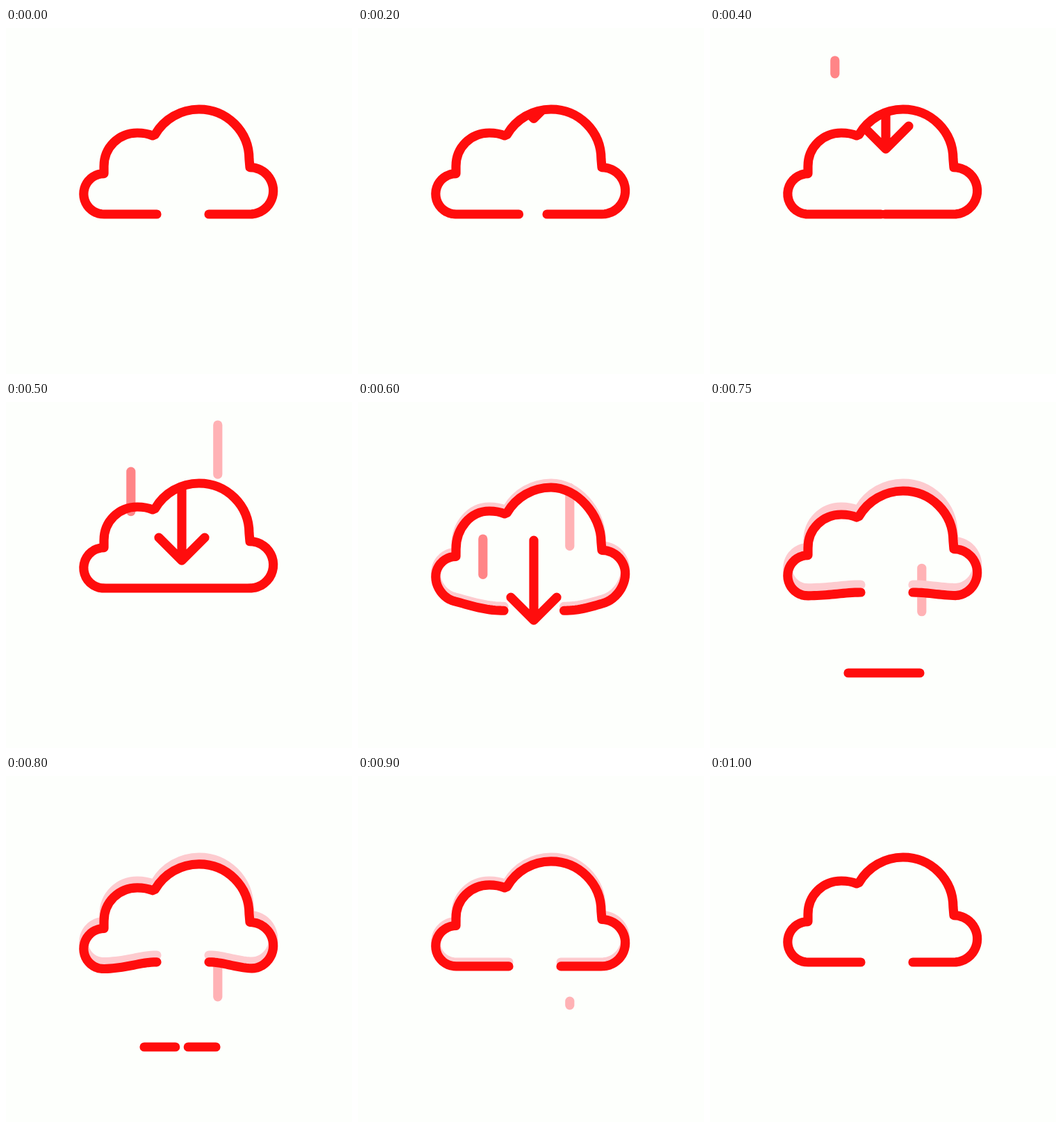
An HTML page for the animation above (1100 ms loop, 498 px wide and 498 px high).

```html
<!DOCTYPE html>
<html lang="en">
<head>
<meta charset="utf-8">
<title>Cloud download</title>
<style>
  html, body { margin: 0; width: 100%; height: 100%; overflow: hidden; background: #fdfffc; }
  svg { display: block; width: 100vw; height: 100vh; }
  path { fill: none; stroke: #ff0d0d; stroke-width: 13.2; stroke-linecap: round; stroke-linejoin: round; }
  #ghost { stroke: #fdcbcf; }
  #dropL { stroke: #ff8587; }
  #dropR { stroke: #ffb2b5; }
</style>
</head>
<body>
<svg viewBox="0 0 498 498">
  <clipPath id="below">
    <circle cx="278" cy="190" r="73"/>
    <rect y="155" width="498" height="343"/>
  </clipPath>
  <path id="dropL"/>
  <path id="dropR"/>
  <path id="ghost"/>
  <g clip-path="url(#below)"><path id="arrow"/></g>
  <path id="cloud"/>
</svg>
<script>
const LOOP = 1100, STEP = 50, LAST = 1000;
const CX = 253, BASE = 268, GROUND = 390, SKY = 33;

const el = id => document.getElementById(id);
const mix = (a, b, k) => a + (b - a) * k;
// Progress from 0 to 1 between two times, and a smooth bump between them.
const ramp = (t, from, to) => Math.min(1, Math.max(0, (t - from) / (to - from)));
const bump = (t, from, to) => Math.sin(Math.PI * ramp(t, from, to)) ** 2;

const lobes = {
  left: { x: 141, r: 29.2, dir: -1, open: 217, spread: 14 },
  right: { x: 351, r: 33.7, dir: 1, open: 292, spread: 9 }
};
const drops = {
  dropL: { x: 179.8, start: 365, life: 345, size: 61, y: 36, v: .543, a: .00107 },
  dropR: { x: 304.8, start: 303, life: 610, size: 84, y: -186, v: 1.504, a: -.00108 }
};

// Points along the base line and round the lobe; the open end is pulled the most.
function lobePoints({ x, r, dir, open, spread }, closed, stretch, rebound) {
  const end = mix(open, 248.5, closed), flat = Math.abs(x - end);
  const total = flat + Math.PI * r, count = 40;
  return Array.from({ length: count + 1 }, (_, i) => {
    const q = total * i / count, turn = Math.max(0, q - flat) / r;
    const pull = (1 + Math.cos(Math.PI * ramp(q, 0, flat + Math.PI * r / 2))) / 2;
    return [
      end + dir * (Math.min(q, flat) + r * Math.sin(turn) + spread * stretch * pull),
      BASE - r + r * Math.cos(turn) + stretch * (13.5 + 39 * pull) - 10 * rebound * pull ** 3
    ];
  });
}

function cloudPath(t) {
  const stretch = bump(t, 550, 750), rebound = bump(t, 700, 900);
  const closed = ramp(t, 0, 435) - ramp(t, 550, 600);
  const left = lobePoints(lobes.left, closed, stretch, rebound);
  const right = lobePoints(lobes.right, closed, stretch, rebound).reverse();
  const low = 14 * stretch;
  return `M${left.join('L')}` +
    `L141 ${199 + low}C141 ${172 + low / 2} 162 151 189 151C197 151 204 152 211 155L214.5 153.5` +
    `A73 73 0 0 1 278 117C${318 - low / 2} 117 350 ${149 + low} 350 ${189 + low}` +
    `L${right.join('L')}`;
}

// The arrow speeds up, flattens on the ground and parts in the middle.
function arrowPath(t) {
  if (t < 150 || t >= 900) return '';
  const fall = 125.5 + .475 * (t / 100) ** 3.34 - 12 * (1 - ramp(t, 0, 200));
  const y = Math.min(GROUND, fall), flat = ramp(t, 650, 750);
  const w = mix(33, 51.5, flat), lean = 2.5 * flat, top = y - 33 * (1 - flat);
  const gap = 37 * ramp(t, 750, 850) ** 2;
  const arms = `M${CX - w - lean} ${top}L${CX - gap} ${y}M${CX + gap} ${y}L${CX + w - lean} ${top}`;
  return flat < 1 ? `${arms}M${CX} ${y - 115 * (1 - flat)}V${y}` : arms;
}

function dropPath({ x, start, life, size, y, v, a }, t) {
  const u = t - start;
  if (u < 0 || u > life) return '';
  const half = size / 2 * Math.sin(Math.PI * u / life), mid = y + v * u + a * u * u;
  return mid + half < SKY ? '' : `M${x} ${Math.max(SKY, mid - half)}V${mid + half}`;
}

function draw(t) {
  const shape = cloudPath(t);
  const dy = 12 * ramp(t, 550, 650) * (1 - ramp(t, 650, 1000) ** 2);
  el('cloud').setAttribute('d', shape);
  el('cloud').setAttribute('transform', `translate(0 ${dy})`);
  el('ghost').setAttribute('d', dy > 0 ? shape : '');
  el('arrow').setAttribute('d', arrowPath(t));
  for (const id in drops) el(id).setAttribute('d', dropPath(drops[id], t));
}

const start = performance.now();
function tick() {
  const t = (performance.now() - start) % LOOP;
  draw(Math.min(LAST, Math.floor(t / STEP) * STEP));
  requestAnimationFrame(tick);
}
tick();
</script>
</body>
</html>
```
